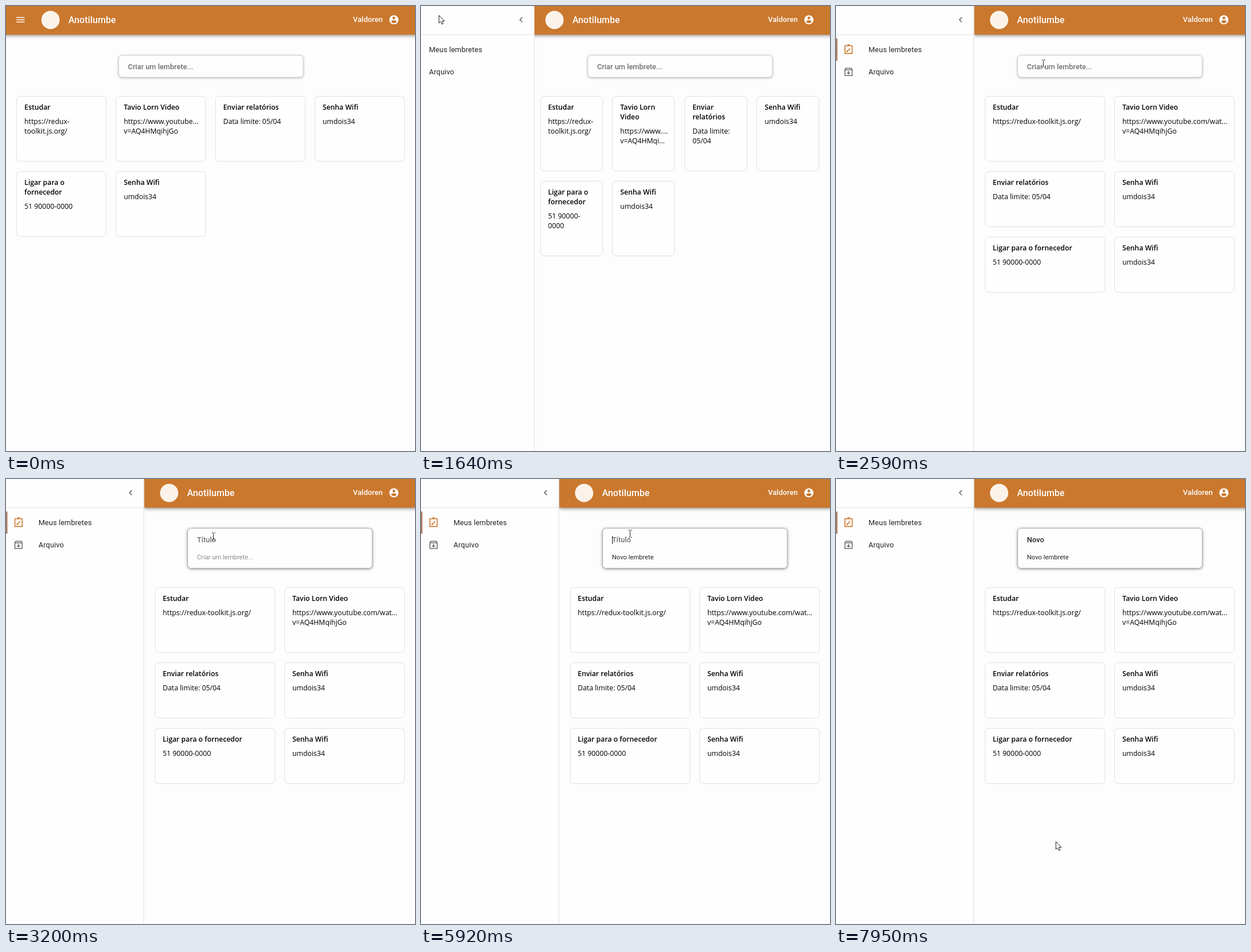
An HTML page with a canvas for the animation above (8 s loop, 717 by 781 pixels).

```html
<!DOCTYPE html>
<html lang="pt-BR">
<head>
<meta charset="utf-8">
<title>Lembretes</title>
<style>
  html, body { margin: 0; width: 100%; height: 100%; overflow: hidden; background: #fdfdfd; }
  canvas { display: block; width: 717px; height: 781px; }
</style>
</head>
<body>
<canvas id="stage"></canvas>
<script>
const W = 717, H = 781, LOOP = 8000, STEP = 68.1;
const DRAWER = 242, ORANGE = '#ca782e', LINE = '#e0e0e0';
const canvas = document.getElementById('stage');
const dpr = window.devicePixelRatio || 1;
canvas.width = W * dpr;
canvas.height = H * dpr;
const ctx = canvas.getContext('2d');

const ROBOTO = 'Roboto, sans-serif', SANS = '"Open Sans", sans-serif';
const FONT = {
  brand: `500 16px ${ROBOTO}`,
  strong: `500 12.85px ${ROBOTO}`,
  item: `400 12.8px ${ROBOTO}`,
  small: `400 11.25px ${ROBOTO}`,
  cardTitle: `600 12.3px ${SANS}`,
  cardText: `400 12.3px ${SANS}`
};

const NOTES = [
  ['Estudar', 'https://redux-toolkit.js.org/'],
  ['Tavio Lorn Video', 'https://www.youtube.com/watch?v=AQ4HMqihjGo'],
  ['Enviar relatórios', 'Data limite: 05/04'],
  ['Senha Wifi', 'umdois34'],
  ['Ligar para o fornecedor', '51 90000-0000'],
  ['Senha Wifi', 'umdois34']
];

// Material icons on a 24 unit grid
const ICON = {
  menu: new Path2D('M3 18h18v-2H3zM3 13h18v-2H3zM3 6v2h18V6z'),
  user: new Path2D('M12 2C6.48 2 2 6.48 2 12s4.48 10 10 10 10-4.48 10-10S17.52 2 12 2zm0 3c1.66 0 3 1.34 3 3s-1.34 3-3 3-3-1.34-3-3 1.34-3 3-3zm0 14.2c-2.5 0-4.71-1.28-6-3.22.03-1.99 4-3.08 6-3.08 1.99 0 5.97 1.09 6 3.08-1.29 1.94-3.5 3.22-6 3.22z'),
  back: new Path2D('M15.41 7.41 14 6l-6 6 6 6 1.41-1.41L10.83 12z'),
  note: new Path2D('M4 4H20V21H4ZM10 3.5A2 2 0 0 1 14 3.5M8.7 16.6L15.5 9.8M8.4 14.5V16.8H10.6'),
  archive: new Path2D('M4 7V20H20V7L18 4H6ZM4 7.5H20M12 10V16M9 13.5L12 16.5 15 13.5')
};
const ARROW = new Path2D('M.5 .5V14L3.6 11.2 5.8 16 8 15 5.9 10.4H10Z');
const HAND = new Path2D('M-1.5 1C-1.5-.5 1.5-.5 1.5 1V6.5L6.5 7.5C8 8 8.5 8.5 8.5 10V13L7 18H-1.5L-5.5 11.5C-6 10-4.5 9.5-3 11L-1.5 12.5Z');

// Pointer path: time, x, y
const PATH = [
  [70, 650, 768], [820, 75, 88], [960, 40, 33], [1030, 34, 23], [1170, 31, 16],
  [2000, 31, 16], [2520, 364, 101], [5780, 364, 101], [5850, 367, 96], [5990, 364, 101],
  [7470, 364, 101], [7900, 385, 636]
];

// The first time of each list is the focus, the others are key presses
const BODY = { text: 'Novo lembrete', times: [2670, 3860, 3930, 4000, 4070, 4200, 4330, 4400, 4520, 4780, 4850, 4980, 5050, 5120] };
const HEAD = { text: 'Novo', times: [5850, 6660, 6860, 6930, 7000] };

const clamp = v => Math.min(1, Math.max(0, v));

// cubic-bezier(0, 0, .2, 1)
function easeOut(p) {
  p = clamp(p);
  let lo = 0, hi = 1;
  for (let i = 0; i < 24; i++) {
    const s = (lo + hi) / 2;
    if (.6 * (1 - s) * s * s + s * s * s < p) lo = s; else hi = s;
  }
  return 3 * (1 - lo) * lo * lo + lo * lo * lo;
}

function pointerAt(t) {
  let i = 0;
  while (i < PATH.length - 2 && t >= PATH[i + 1][0]) i++;
  const [t0, x0, y0] = PATH[i], [t1, x1, y1] = PATH[i + 1];
  const p = clamp((t - t0) / (t1 - t0));
  return { x: x0 + (x1 - x0) * p, y: y0 + (y1 - y0) * p, on: t >= 68 };
}

const inside = (p, x, y, w, h) => p.on && p.x >= x && p.x <= x + w && p.y >= y && p.y <= y + h;

function text(str, x, y, font, color, spacing = 0) {
  ctx.font = font;
  ctx.letterSpacing = spacing + 'px';
  ctx.fillStyle = color;
  ctx.fillText(str, x, y);
  const w = ctx.measureText(str).width;
  ctx.letterSpacing = '0px';
  return w;
}

function icon(path, cx, cy, color, stroke) {
  ctx.save();
  ctx.translate(cx - 9.6, cy - 9.6);
  ctx.scale(.8, .8);
  ctx.fillStyle = ctx.strokeStyle = color;
  ctx.lineWidth = 2;
  ctx.lineJoin = 'round';
  if (stroke) ctx.stroke(path); else ctx.fill(path);
  ctx.restore();
}

function disc(x, y, r, color) {
  ctx.fillStyle = color;
  ctx.beginPath();
  ctx.arc(x, y, r, 0, 7);
  ctx.fill();
}

function panel(x, y, w, h, border, shadow, blur, dy) {
  ctx.beginPath();
  ctx.roundRect(x, y, w, h, 6);
  ctx.save();
  if (shadow) {
    ctx.shadowColor = `rgba(0,0,0,${shadow})`;
    ctx.shadowBlur = blur * dpr;
    ctx.shadowOffsetY = dy * dpr;
  }
  ctx.fillStyle = '#fefefe';
  ctx.fill();
  ctx.restore();
  ctx.strokeStyle = border;
  ctx.lineWidth = 1;
  ctx.stroke();
}

function fit(line, max) {
  if (ctx.measureText(line).width <= max) return line;
  while (line && ctx.measureText(line + '...').width > max) line = line.slice(0, -1);
  return line + '...';
}

function wrap(str, max, font) {
  ctx.font = font;
  const lines = [''];
  for (const word of str.match(/[^\s?-]+[\s?-]*/g)) {
    const last = lines[lines.length - 1];
    if (last && ctx.measureText((last + word).trim()).width > max) lines.push(word);
    else lines[lines.length - 1] = last + word;
  }
  return lines.map(l => fit(l.trim(), max + 2));
}

function drawCards(left, top, cols, pointer) {
  const gap = 16.5, w = (699 - left - gap * (cols - 1)) / cols;
  let y = top;
  for (let i = 0; i < NOTES.length; i += cols) {
    const row = NOTES.slice(i, i + cols).map(([title, body]) => ({
      title: wrap(title, w - 27, FONT.cardTitle),
      body: wrap(body, w - 27, FONT.cardText)
    }));
    const h = 98 + 17 * (Math.max(...row.map(c => c.title.length + c.body.length)) - 2);
    row.forEach((c, k) => {
      const x = left + k * (w + gap);
      const hover = inside(pointer, x, y, w, h);
      panel(Math.floor(x) + .5, Math.round(y) + .5, Math.round(w) - 1, h - 1, LINE, hover && .4, 3, 1);
      let base = Math.round(y + 24);
      c.title.forEach(l => { text(l, x + 13.6, base, FONT.cardTitle, '#000'); base += 17; });
      base += 8;
      c.body.forEach(l => { text(l, x + 13.6, base, FONT.cardText, '#000'); base += 17; });
    });
    y += h + 17;
  }
}

function drawField(field, t, x, y, font, color, hint, hintColor, active) {
  const keys = field.times.filter(k => k <= t);
  const typed = field.text.slice(0, Math.max(0, keys.length - 1));
  const w = typed ? text(typed, x, y, font, color) : 0;
  if (!typed) text(hint, x, y, font, hintColor);
  if (active && keys.length && Math.floor((t - keys[keys.length - 1]) / 530) % 2 === 0) {
    ctx.fillStyle = '#111';
    ctx.fillRect(Math.round(x + w), y - 11, 1, 14);
  }
}

function drawInput(x, open, t) {
  const h = 39 + 31.6 * open;
  panel(x + .5, 86.5, 323.5, h - .5, open > .5 ? '#b4b4b4' : '#d0d0d0', .35 + .2 * open, 4 + open, 1);
  const tx = x + 16.8;
  if (open <= 0) {
    text('Criar um lembrete...', tx, 110.7, FONT.strong, '#6e6e6e');
    return;
  }
  drawField(HEAD, t, tx, 111, FONT.strong, '#222', 'Título', '#6e6e6e', t >= HEAD.times[0]);
  ctx.save();
  ctx.globalAlpha = open;
  drawField(BODY, t, tx, 141, FONT.small, '#222', 'Criar um lembrete...', '#8a8a8a', t < HEAD.times[0]);
  ctx.restore();
}

function drawBar(margin, menu, t, pointer) {
  ctx.save();
  ctx.shadowColor = 'rgba(0,0,0,.45)';
  ctx.shadowBlur = 6 * dpr;
  ctx.shadowOffsetY = 1.5 * dpr;
  ctx.fillStyle = ORANGE;
  ctx.fillRect(margin - (margin ? 0 : 10), -10, W + 20, 60.4);
  ctx.restore();
  if (menu) {
    if (inside(pointer, 9, 8, 33, 33)) disc(25.5, 24, 16, 'rgba(0,0,0,.04)');
    if (t >= 1370) disc(29, 21.5, 14, 'rgba(255,255,255,.1)');
    icon(ICON.menu, 25.5, 24.2, '#fff');
  }
  const x = menu ? 54 : margin + 19.5;
  disc(x + 24, 24.5, 16, '#fbf3ea');
  text('Anotilumbe', x + 55.5, 30, FONT.brand, '#fff', .1);
  ctx.textAlign = 'right';
  text('Valdoren', 660.5, 28.4, FONT.strong, '#fff', .12);
  ctx.textAlign = 'left';
  icon(ICON.user, 680, 24.2, '#fff');
}

function drawDrawer(edge, pointer) {
  if (edge <= 0) return;
  ctx.save();
  ctx.translate(edge - DRAWER, 0);
  ctx.fillStyle = '#fefefe';
  ctx.fillRect(0, 0, DRAWER, H);
  [57, 96].forEach(y => {
    if (edge === DRAWER && inside(pointer, 0, y, DRAWER, 39)) {
      ctx.fillStyle = 'rgba(0,0,0,.04)';
      ctx.fillRect(0, y, DRAWER - 1, 39);
    }
  });
  ctx.fillStyle = LINE;
  ctx.fillRect(DRAWER - 1, 0, 1, H);
  ctx.fillRect(0, 50, DRAWER, 1);
  ctx.fillStyle = '#b07d5f';
  ctx.fillRect(0, 57, 2.5, 39);
  icon(ICON.back, 218.5, 24, '#666');
  icon(ICON.note, 22, 76.2, ORANGE, true);
  icon(ICON.archive, 22, 115.6, '#6e6e6e', true);
  text('Meus lembretes', 57, 80.8, FONT.item, '#222', .13);
  text('Arquivo', 57, 119.8, FONT.item, '#222', .13);
  ctx.restore();
}

function drawPointer(p, kind) {
  if (!p.on) return;
  ctx.save();
  ctx.translate(Math.round(p.x), Math.round(p.y));
  ctx.lineWidth = 1;
  ctx.lineJoin = 'round';
  ctx.strokeStyle = '#222';
  ctx.fillStyle = '#fff';
  if (kind === 'text') {
    ctx.stroke(new Path2D('M-3-6.5H-1M1-6.5H3M-.5-6V6M-3 6.5H-1M1 6.5H3'));
  } else {
    const shape = kind === 'hand' ? HAND : ARROW;
    ctx.fill(shape);
    ctx.stroke(shape);
  }
  ctx.restore();
}

function draw(t) {
  const q = Math.floor(t / STEP) * STEP;   // screen is sampled at about 15 fps
  const pointer = pointerAt(q);
  const edge = DRAWER * easeOut((q - 1527) / 225);
  const margin = 242.5 * easeOut((q - 1537) / 225);
  const menu = t < 1510;
  const open = easeOut((q - 2620) / 180);
  const inputX = Math.floor((W + margin) / 2 - 161.5);

  ctx.setTransform(dpr, 0, 0, dpr, 0, 0);
  ctx.fillStyle = '#fdfdfd';
  ctx.fillRect(0, 0, W, H);
  drawCards(margin + 18.7, 158 + 31.6 * open, margin > 215 ? 2 : 4, pointer);
  drawInput(inputX, open, t);
  drawBar(margin, menu, t, pointer);
  const openEdge = edge > DRAWER - .5 ? DRAWER : edge;
  drawDrawer(openEdge, pointer);

  let kind = 'arrow';
  if (menu && inside(pointer, 9, 8, 33, 33)) kind = 'hand';
  else if (inside(pointer, 0, 57, openEdge, 78)) kind = 'hand';
  else if (inside(pointer, inputX, 86, 323, 39 + 31 * open)) kind = 'text';
  drawPointer(pointer, kind);
}

function tick() {
  draw(performance.now() % LOOP);
  requestAnimationFrame(tick);
}
tick();
</script>
</body>
</html>
```
